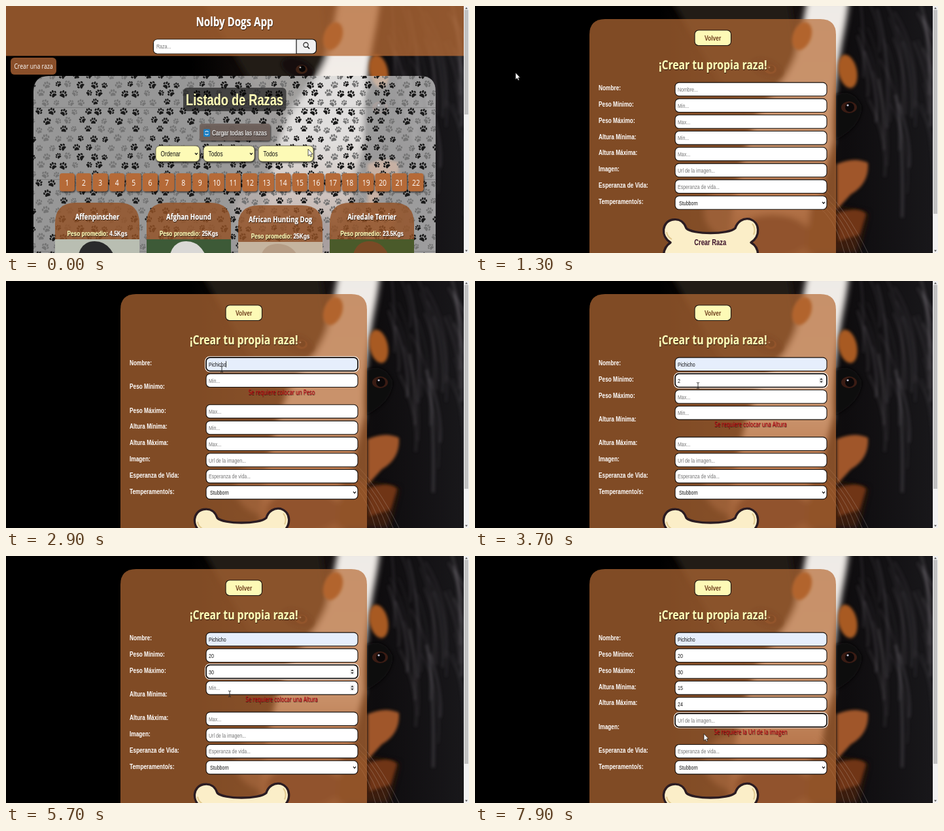
Recreate the animation shown at these times as an HTML page. Size 708x378 px, loop 8000 ms.

```html
<!DOCTYPE html>
<html lang="es">
<head>
<meta charset="utf-8">
<title>Nolby Dogs App</title>
<style>
  html, body { margin: 0; width: 100%; height: 100%; overflow: hidden; background: #000; }
  svg { display: block; width: 708px; height: 378px; }
  text { white-space: pre; }
</style>
</head>
<body>
<svg viewBox="0 0 708 378" xmlns="http://www.w3.org/2000/svg">
  <defs>
    <filter id="soft" x="-30%" y="-30%" width="160%" height="160%"><feGaussianBlur stdDeviation="5"/></filter>
    <filter id="fine" x="-30%" y="-30%" width="160%" height="160%"><feGaussianBlur stdDeviation="2"/></filter>
    <filter id="shadow" x="-20%" y="-30%" width="140%" height="180%">
      <feDropShadow dx="1" dy="1.6" stdDeviation="1.2" flood-color="#000" flood-opacity=".75"/>
    </filter>
    <linearGradient id="coat">
      <stop offset=".4" stop-color="#000"/><stop offset=".6" stop-color="#1d1411"/>
      <stop offset=".8" stop-color="#0e0c0e"/><stop offset="1" stop-color="#19181b"/>
    </linearGradient>
    <linearGradient id="blaze" x1="0" y1="0" x2="0" y2="1">
      <stop offset="0" stop-color="#eeeae6"/><stop offset=".55" stop-color="#f6efea"/>
      <stop offset=".75" stop-color="#b99282"/><stop offset="1" stop-color="#5c3a30"/>
    </linearGradient>
    <g id="paw">
      <path d="M0 -.6C2.2 -.6 4.4 2.2 4 3.8C3.5 5.4 1.4 4.4 0 4.4S-3.5 5.4 -4 3.8C-4.4 2.2 -2.2 -.6 0 -.6Z"/>
      <ellipse cx="-4.6" cy="-.9" rx="1.4" ry="2"/><ellipse cx="4.6" cy="-.9" rx="1.4" ry="2"/>
      <ellipse cx="-1.8" cy="-3.7" rx="1.5" ry="2.2"/><ellipse cx="1.8" cy="-3.7" rx="1.5" ry="2.2"/>
    </g>
    <pattern id="paws" x="42" y="45" width="110" height="110" patternUnits="userSpaceOnUse"></pattern>
  </defs>
  <g id="photo"></g>
  <g id="list"></g>
  <g id="form"></g>
  <g id="bar"></g>
  <g id="cursor"></g>
</svg>
<script>
const LOOP = 8000, FORM_AT = 1300;
const ARIAL = "'Liberation Sans', Arial, sans-serif";
const HUMAN = "'Open Sans', 'Noto Sans', sans-serif";
const CREAM = '#fdfab6', BROWN = '#8a5029', WHITE = '#fff';
const layer = id => document.getElementById(id);
const times = (n, fn) => Array.from({ length: n }, (_, i) => fn(i)).join('');

let seed = 11;
const random = () => (seed = (seed * 16807) % 2147483647) / 2147483647;
const between = (a, b) => a + (b - a) * random();

const rect = (x, y, w, h, r, fill, extra = '') =>
  `<rect x="${x}" y="${y}" width="${w}" height="${h}" rx="${r}" fill="${fill}" ${extra}/>`;
const path = (d, fill, extra = '') => `<path d="${d}" fill="${fill}" ${extra}/>`;
const ellipse = (x, y, rx, ry, fill, extra = '') =>
  `<ellipse cx="${x}" cy="${y}" rx="${rx}" ry="${ry}" fill="${fill}" ${extra}/>`;

const text = (x, y, body, size, fill, { font = ARIAL, weight = 400, anchor = 'start', extra = '' } = {}) =>
  `<text transform="translate(${x} ${y + size * .236}) scale(.518 .66)" font-family="${font}" font-size="${size}"
    font-weight="${weight}" text-anchor="${anchor}" fill="${fill}" ${extra}>${body}</text>`;
const SHADOW = 'filter="url(#shadow)"';
const chevron = (x, y) =>
  path(`M${x - 2} ${y - 1.2}l2 2.4l2 -2.4`, 'none', 'stroke="#111" stroke-width="1.2"');

function drawPhoto() {
  const strand = () => {
    const x = between(585, 690), y = between(-40, 150), sway = between(10, 40);
    return path(`M${x} ${y}q${sway} 60 ${sway * .8} ${between(90, 190)}`, 'none',
      `stroke="#77727a" stroke-width="${between(1, 5)}" opacity="${between(.08, .34)}"`);
  };
  const whisker = i => path(`M${490 + i * 9} ${292 - i * 5}Q${545 + i * 6} ${300 + i * 3} ${565 + i * 9} 378`, 'none',
    'stroke="#cfc4bb" stroke-width=".6" opacity=".5"');
  layer('photo').innerHTML =
    rect(0, 0, 708, 378, 0, 'url(#coat)') +
    `<g filter="url(#soft)">` +
      path('M300 -10L480 -10L495 90L440 190L370 110Z', '#211a18') +
      ellipse(405, 315, 55, 45, '#7d5f56', 'opacity=".7"') +
      path('M508 -10H572C568 30 560 55 557 85C550 130 546 170 548 205L535 260L515 390H385C395 300 405 235 425 185C445 145 478 115 492 75Z', 'url(#blaze)') +
      ellipse(455, 352, 58, 34, '#3a1d1a') +
      path('M512 300L600 318L585 378H505Z', '#3b1c10') +
    `</g><g filter="url(#fine)">` +
      ellipse(500, 46, 14, 22, '#a9551c', 'transform="rotate(20 500 46)"') +
      ellipse(570, 100, 14, 26, '#a85a24', 'transform="rotate(-12 570 100)"') +
      path('M552 135Q580 125 592 155Q590 185 552 205Z', '#0b0809') +
      path('M553 242Q580 230 601 240Q603 272 575 288L553 312Z', '#a0572a') +
      path('M553 318Q585 305 598 318L588 350L556 360Z', '#6f3413') +
      ellipse(446, 95, 26, 14, '#15100f', 'transform="rotate(20 446 95)"') +
      times(34, strand) +
    `</g>` +
    ellipse(452, 97, 9, 7, '#3d2115') + ellipse(453, 96, 5, 5, '#080606') + ellipse(450, 94, 1.4, 1.2, '#aaa') +
    ellipse(572, 155, 12, 9, '#3a1c14') + ellipse(573, 155, 7, 7, '#0a0708') + ellipse(570, 152, 1.6, 1.4, '#ccd') +
    times(5, whisker);
}

// Staggered rows of loosely scattered prints; the copy to the left closes the tile's seam.
function drawPaws() {
  const columns = 6, rows = 8;
  layer('paws').innerHTML = rect(0, 0, 110, .8, 0, '#555', 'opacity=".5"') + times(columns * rows, i => {
    const row = Math.floor(i / columns);
    const x = (i % columns + .5 + row % 2 / 2) * 110 / columns + between(-3, 3);
    const y = (row + .5) * 110 / rows + between(-1.5, 1.5);
    const turn = between(-60, 60), size = between(.75, 1);
    const fill = random() < .65 ? '#191919' : '#747474';
    return [x, x - 110].map(left => `<use href="#paw" fill="${fill}"
      transform="translate(${left} ${y}) rotate(${turn}) scale(${size})"/>`).join('');
  });
}

function drawCard([name, weight, dy, sky, coat], i) {
  const x = 75 + i * 140, y = 301 + dy, mid = x + 64.5;
  return path(`M${x} 378V${y + 32}Q${x} ${y} ${x + 32} ${y}H${x + 97}Q${x + 129} ${y} ${x + 129} ${y + 32}V378Z`,
      'rgba(148,82,38,.82)') +
    text(mid, 322.5 + dy, name, 18.6, WHITE, { font: HUMAN, weight: 700, anchor: 'middle', extra: SHADOW }) +
    text(mid, 348.5 + dy, `<tspan fill="${CREAM}">Peso promedio:</tspan> ${weight}Kgs`, 16, WHITE,
      { weight: 700, anchor: 'middle', extra: SHADOW }) +
    rect(x, 357 + dy, 129, 21 - dy, 0, sky) +
    path(`M${mid - 28} 378Q${mid - 22} ${360 + dy} ${mid - 4} ${360 + dy}T${mid + 24} 378Z`, coat);
}

function drawList(hover) {
  const select = (x, w, label) =>
    rect(x, 214, w, 24, 6, CREAM, `stroke="#4a4632" stroke-width=".7" ${SHADOW}`) +
    text(x + 7.5, 226, label, 16, '#111') + chevron(x + w - 5, 226);
  const pageButton = i => {
    const x = 93.5 + i * 25.4;
    return rect(x - 11.5, 256, 23, 27.5, 4, '#b56a37', SHADOW) +
      text(x, 270.5, i + 1, 20, WHITE, { font: HUMAN, anchor: 'middle' });
  };
  const panel = 'M42 378V131Q42 107 66 107H633Q657 107 657 131V378Z';
  const cards = [
    ['Affenpinscher', '4.5', 0, '#b9beb2', '#2a2a2c'],
    ['Afghan Hound', '25', 0, '#3d5a37', '#d9d8d6'],
    ['African Hunting Dog', '25', 4, '#c5b49f', '#b59d86'],
    ['Airedale Terrier', '23.5', 0, '#4a5a2a', '#7a4a26'],
  ];
  return rect(0, 0, 700, 76.4, 0, 'rgba(183,107,54,.77)') +
    text(349.5, 24.5, 'Nolby Dogs App', 29.2, WHITE, { font: HUMAN, weight: 700, anchor: 'middle', extra: SHADOW }) +
    rect(225.5, 51, 249, 22, 6, '#f0f0f0', 'stroke="#111" stroke-width="1.2"') +
    path('M444 51.6H231.5Q226 51.6 226 57V67Q226 72.4 231.5 72.4H444Z', WHITE) +
    path('M444 51V73', 'none', 'stroke="#111" stroke-width="1.2"') +
    text(230, 62, 'Raza...', 13.7, '#757575') +
    `<circle cx="458.5" cy="59.5" r="3.6" fill="none" stroke="#111" stroke-width="1.1"/>` +
    path('M461 62.3L464 65.6', 'none', 'stroke="#111" stroke-width="1.5"') +
    rect(7, 79, 70, 26, 6, hover ? CREAM : BROWN, SHADOW) +
    text(42, 92.5, 'Crear una raza', 16.8, hover ? '#111' : WHITE, { font: HUMAN, anchor: 'middle' }) +
    path(panel, 'rgba(215,215,215,.7)') + path(panel, 'url(#paws)') +
    rect(271, 125, 157.5, 36, 6, 'rgba(0,0,0,.56)') +
    text(349.5, 143.5, 'Listado de Razas', 35.2, CREAM, { weight: 700, anchor: 'middle', extra: SHADOW }) +
    rect(296, 180, 108, 26, 4, 'rgba(112,98,93,.88)', SHADOW) +
    rect(302, 188.5, 10, 11.5, 1.5, '#1c7fc4') +
    path('M304.5 193A2.8 2.8 0 0 1 309.5 193M309.5 195.4A2.8 2.8 0 0 1 304.5 195.4', 'none', 'stroke="#fff" stroke-width="1.1"') +
    text(315, 194, 'Cargar todas las razas', 16.1, WHITE, { extra: SHADOW }) +
    select(229, 67, 'Ordenar') + select(302, 78, 'Todos') + select(386, 84, 'Todos') +
    times(22, pageButton) + cards.map(drawCard).join('');
}

// Each field: label, hint, time of the click and the values typed.
const fields = [
  ['Nombre:', 'Nombre...', 2000, [[2200, 'p'], [2400, 'pi'], [2600, 'pic'], [2800, 'Pichicho']]],
  ['Peso Mínimo:', 'Min...', 3200, [[3500, '2'], [3800, '20']]],
  ['Peso Máximo:', 'Max...', 4600, [[4900, '3'], [5100, '30']]],
  ['Altura Mínima:', 'Min...', 5800, [[6200, '1'], [6400, '15']]],
  ['Altura Máxima:', 'Max...', 7000, [[7200, '2'], [7400, '24']]],
  ['Imagen:', 'Url de la imagen...', 7700, []],
  ['Esperanza de Vida:', 'Esperanza de vida...', Infinity, []],
  ['Temperamento/s:', '', Infinity, []],
].map(([label, hint, click, keys]) => ({ label, hint, click, keys }));

const errors = [
  [2200, { row: 1, message: 'Se requiere colocar un Peso' }],
  [3500, { row: 3, message: 'Se requiere colocar una Altura' }],
  [6200, { row: 5, message: 'Se requiere la Url de la imagen' }],
];
const latest = (steps, t, none) => steps.reduce((value, [at, next]) => t >= at ? next : value, none);
const errorAt = t => latest(errors, t, { row: 99, message: '' });
const inputY = (row, t) => 127.4 + 24.8 * row + (row > errorAt(t).row ? 22.6 : 0);
const isOver = (row, t, { x, y }) => x > 306 && x < 538 && Math.abs(y - inputY(row, t)) <= 10.7;

function drawField({ label, hint, click, keys }, row, t, mouse) {
  const error = errorAt(t), y = inputY(row, t);
  const labelY = 125.5 + 24.8 * row + (row > error.row ? 22.7 : row === error.row ? 11.4 : 0);
  const value = latest(keys, t, '');
  const focused = t >= click && !(fields[row + 1]?.click <= t);
  const numeric = row > 0 && row < 5;
  const fill = value === 'Pichicho' ? '#e6eefc' : WHITE;
  let out = text(189, labelY, label, 16, WHITE, { weight: 700 });
  if (focused) out += rect(304.6, y - 11.6, 234.8, 23.2, 7, 'none', 'stroke="#fff" stroke-width="1.2"');
  out += rect(306, y - 10.3, 232, 20.6, 6, fill, `stroke="#15100e" stroke-width="${focused ? 1.7 : 1.1}"`);
  if (row === 7) return out + text(312, y + .3, 'Stubborn', 13.7, '#111') + chevron(533, y);
  out += text(310, y + .3, value || hint, 13.6, value ? '#111' : '#757575');
  if (focused && (t - Math.max(click, latest(keys.map(([at]) => [at, at]), t, 0))) % 1000 < 190) {
    const width = [...value].reduce((w, c) => w + (c === 'i' ? 1.6 : c === 'c' ? 3.5 : 3.95), 0);
    out += rect(310.2 + width, y - 4.8, .8, 9.6, 0, '#111');
  }
  if (numeric && (focused || isOver(row, t, mouse))) {
    out += rect(526, y - 4.5, 7, 9, 0, '#ededed') +
      path(`M527.3 ${y - 1}l2.2 -2.6l2.2 2.6zM527.3 ${y + 1}l2.2 2.6l2.2 -2.6z`, '#333');
  }
  if (row === error.row) {
    out += text(421.5, y + 18, error.message, 15.2, '#c00012', { font: HUMAN, anchor: 'middle', extra: SHADOW });
  }
  return out;
}

function drawForm(t, mouse) {
  const drop = t >= errors[0][0] ? 22.5 : 0;
  return path('M175 378V44Q175 20 199 20H528Q552 20 552 44V378Z', 'rgba(183,107,54,.7)') +
    rect(336, 37, 55.5, 23.5, 6, CREAM, 'stroke="#1c1512" stroke-width="1.1"') +
    text(363.7, 48.8, 'Volver', 16.4, '#6f3f1d', { weight: 700, anchor: 'middle' }) +
    text(363.7, 90, '¡Crear tu propia raza!', 30.4, CREAM, { font: HUMAN, weight: 700, anchor: 'middle', extra: SHADOW }) +
    fields.map((field, row) => drawField(field, row, t, mouse)).join('') +
    `<g transform="translate(0 ${drop})">` +
      path('M299 362C283 352 286 330 302 327C313 325 320 331 323 340C332 350 388 350 398 340C401 330 410 324 420 326C436 331 437 352 422 362C436 370 436 390 424 400H296C284 388 287 370 299 362Z',
        '#fbeec8', 'stroke="#2b1c22" stroke-width="3.4" stroke-linejoin="round"') +
      path('M293 346Q294 353 301 357M424 333Q430 341 426 350', 'none', 'stroke="#e2c98f" stroke-width="2"') +
      text(359.7, 362, 'Crear Raza', 18.1, '#3a1028', { weight: 700, anchor: 'middle' }) +
    `</g>`;
}

function drawBar(isForm) {
  return rect(700, 0, 8, 378, 0, '#f1f1f1') + rect(701, 6, 6, isForm ? 312 : 160, 0, '#c1c1c1') +
    path('M702 4.5l2 -2.5l2 2.5zM702 373.5l2 2.5l2 -2.5z', '#505050');
}

// Time, x and y of the pointer's stops.
const stops = [
  [100, 462, 219], [950, 41, 97], [1200, 41, 97], [1300, 62, 102], [1400, 68, 104], [2000, 330, 135],
  [2900, 330, 135], [3200, 341, 157], [3500, 341, 160], [4300, 341, 160], [4600, 341, 179],
  [5300, 341, 179], [5700, 342, 211], [6400, 342, 208], [6900, 345, 230], [7450, 345, 230],
  [7650, 350, 254], [7750, 350, 256], [7900, 350, 272],
];
function mouseAt(t) {
  const next = stops.findIndex(([at]) => at > t);
  const [t1, x1, y1] = stops.at(next < 0 ? -1 : next);
  if (next <= 0) return { x: x1, y: y1 };
  const [t0, x0, y0] = stops[next - 1];
  const p = (t - t0) / (t1 - t0), ease = p * p * (3 - 2 * p);
  return { x: x0 + (x1 - x0) * ease, y: y0 + (y1 - y0) * ease };
}

function drawCursor(kind, { x, y }) {
  const shapes = {
    arrow: path('M0 0V10.6L2.4 8.4L4 12L5.6 11.2L4.1 7.8H7.2Z', WHITE, 'stroke="#111" stroke-width=".7"'),
    hand: path('M-1 1Q0 -.8 1 1V5L5 6Q6 6.5 5.6 8.5L4.4 12H-1.4L-4 7.6Q-3.6 6.2 -1 8Z', WHITE, 'stroke="#111" stroke-width=".8"'),
    beam: path('M-2 -4.5Q0 -4.5 0 -3.5Q0 -4.5 2 -4.5M0 -3.5V3.5M-2 4.5Q0 4.5 0 3.5Q0 4.5 2 4.5', 'none', 'stroke="#222" stroke-width=".9"'),
  };
  return `<g transform="translate(${x} ${y})">${shapes[kind]}</g>`;
}

const shown = {};
function show(id, markup) {
  if (shown[id] !== markup) layer(id).innerHTML = shown[id] = markup;
}

function render(t) {
  const isForm = t >= FORM_AT, mouse = mouseAt(t);
  const hover = !isForm && mouse.x > 7 && mouse.x < 77 && mouse.y > 79 && mouse.y < 105;
  const overField = isForm && fields.slice(0, 7).some((_, row) => isOver(row, t, mouse));
  show('list', isForm ? '' : drawList(hover));
  show('form', isForm ? drawForm(t, mouse) : '');
  show('bar', drawBar(isForm));
  show('cursor', drawCursor(hover ? 'hand' : overField ? 'beam' : 'arrow', mouse));
}

drawPhoto();
drawPaws();
const start = performance.now();
function tick() {
  render((performance.now() - start) % LOOP);
  requestAnimationFrame(tick);
}
tick();
</script>
</body>
</html>
```
